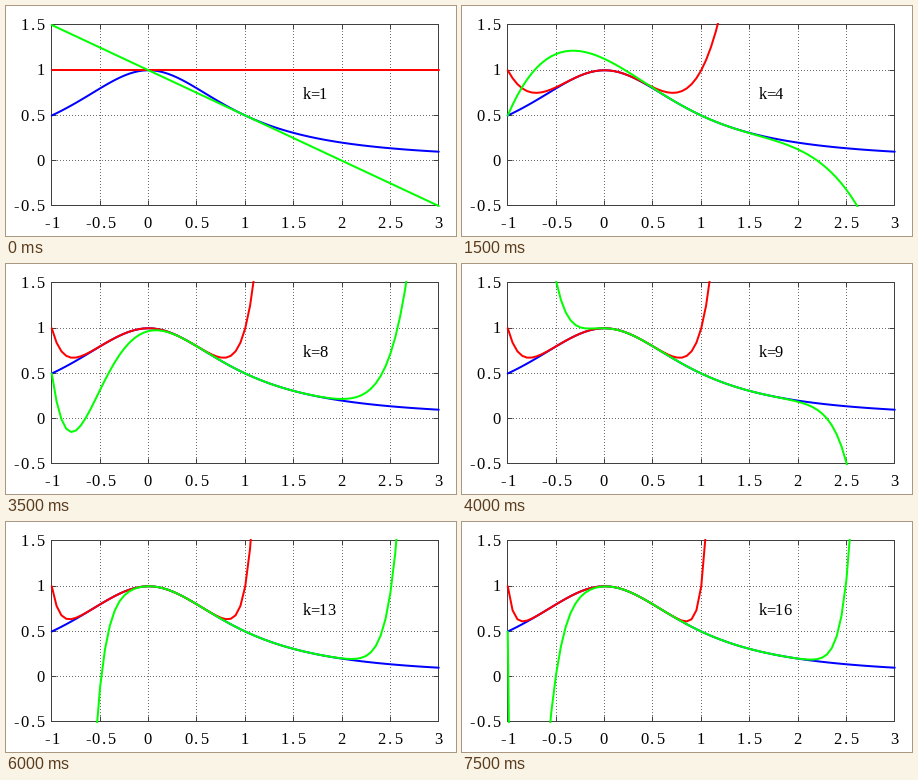
Animation of 450x230 px, one loop 8000 ms. Source, as a matplotlib script:

```python
"""Taylor polynomials of 1 / (1 + x^2) about x = 0 and x = 1, degrees 1 to 16."""
import numpy as np
import matplotlib.pyplot as plt
from matplotlib.animation import FuncAnimation
from matplotlib.transforms import Affine2D

WIDTH, HEIGHT, DPI = 450, 230, 80
PX = 72 / DPI  # points per pixel
LEFT, RIGHT, TOP, BOTTOM = 45.25, 432.25, 18.25, 199.25
CELL = 8  # character pitch in pixels
MAX_DEGREE = 16
INK = "#404040"

x = np.linspace(-1, 3, 81)


def taylor(center, degree):
    """1 / (1 + x^2) is Im(1 / (x - i)), which expands as a geometric series."""
    pole = center - 1j
    n = np.arange(degree + 1)
    coefs = ((-1.0) ** n / pole ** (n + 1)).imag
    return np.polynomial.polynomial.polyval(x - center, coefs)


fig = plt.figure(figsize=(WIDTH / DPI, HEIGHT / DPI), dpi=DPI, facecolor="white")
ax = fig.add_axes([LEFT / WIDTH, 1 - BOTTOM / HEIGHT,
                   (RIGHT - LEFT) / WIDTH, (BOTTOM - TOP) / HEIGHT])
x_ticks = np.arange(-1, 3.1, 0.5)
y_ticks = np.arange(-0.5, 1.6, 0.5)
ax.set(xlim=(-1, 3), ylim=(-0.5, 1.5), xticks=x_ticks, yticks=y_ticks)
ax.set_axisbelow(True)
ax.grid(color="#707070", linewidth=PX, linestyle=(0.5, (1, 2)))
ax.tick_params(direction="in", length=5 * PX, width=PX, color=INK,
               top=True, right=True, labelbottom=False, labelleft=False)
for spine in ax.spines.values():
    spine.set(linewidth=PX, color=INK)


def cell_text(left, baseline, text):
    """Draw text on a fixed character grid, in pixels from the top left."""
    return [fig.text((left + CELL * (i + 0.5)) / WIDTH, 1 - baseline / HEIGHT, char,
                     family="Liberation Serif", fontsize=16.5 * PX,
                     ha="center", va="baseline", color="black")
            for i, char in enumerate(text)]


for value in x_ticks:
    name = f"{value:g}"
    tick_x = LEFT + (value + 1) / 4 * (RIGHT - LEFT)
    cell_text(tick_x - CELL * len(name) / 2, 222, name)
for value in y_ticks:
    name = f"{value:g}"
    tick_y = BOTTOM - (value + 0.5) / 2 * (BOTTOM - TOP)
    cell_text(38.5 - CELL * len(name), tick_y + 6, name)
label = cell_text(297, 93, "k=  ")

# The pen is centred on pixels, slightly right of and below the axes' edges.
pen = ax.transData + Affine2D().translate(0.5, -0.75)


def curve(y, color):
    line, = ax.plot(x, y, color=color, linewidth=2 * PX, transform=pen,
                    solid_capstyle="round", zorder=3)
    line.set_clip_box(ax.bbox.padded(1.5))
    return line


curve(1 / (1 + x**2), "#0000ff")
about_zero = curve(taylor(0, 1), "#ff0000")
about_one = curve(taylor(1, 1), "#00ff00")
ax.set(xlim=(-1, 3), ylim=(-0.5, 1.5))


def draw(frame):
    degree = frame + 1
    about_zero.set_ydata(taylor(0, degree))
    about_one.set_ydata(taylor(1, degree))
    for glyph, char in zip(label, f"k={degree}".ljust(4)):
        glyph.set_text(char)
    return [about_zero, about_one, *label]


animation = FuncAnimation(fig, draw, frames=MAX_DEGREE, interval=500,
                          repeat=True, repeat_delay=0)
plt.show()
```
